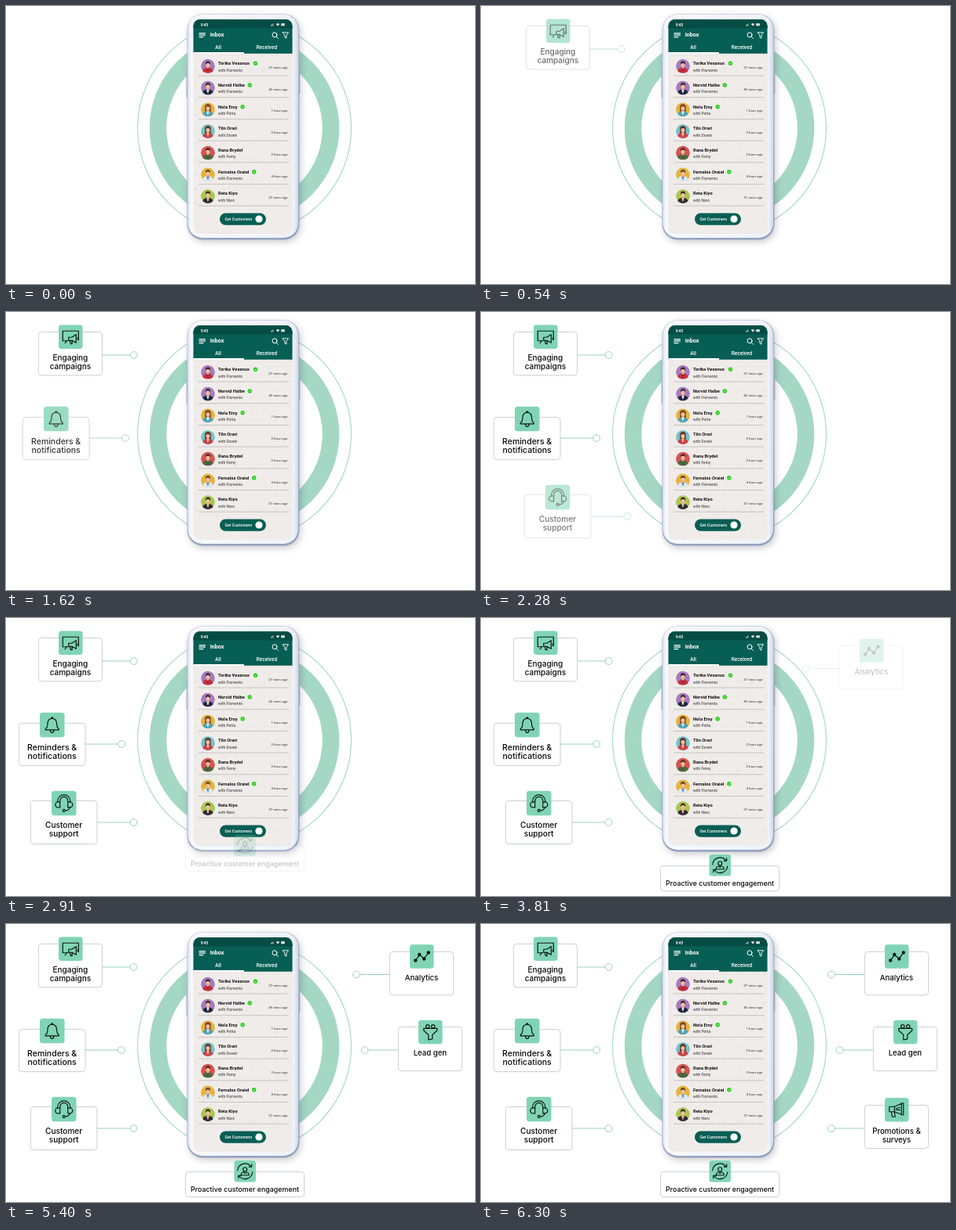
Animation, 597 px wide and 355 px high, one loop 8.3 s. Source, as an HTML page:

```html
<!DOCTYPE html>
<html lang="en">
<head>
<meta charset="utf-8">
<title>Inbox features</title>
<style>
  html, body { margin: 0; width: 100%; height: 100%; overflow: hidden; background: #fff; }
  svg { display: block; }
  text { font-family: Roboto, sans-serif; }
  .card text { font-family: Inter, sans-serif; font-weight: 500; fill: #080808; text-anchor: middle; }
  .box { fill: #fff; stroke: #bcc0c3; stroke-width: .7; filter: drop-shadow(.3px .5px .8px #0001); }
  .link { fill: #fff; stroke: #9bd2bc; }
  .icon { fill: none; stroke: #0c1a14; stroke-width: 1.2; stroke-linecap: round; stroke-linejoin: round; }
  .icon .solid { fill: #0c1a14; stroke: none; }
  .icon .tile { fill: #80d4b5; }
  .name { font-size: 5.8px; font-weight: 700; fill: #111; }
  .sub { font-size: 4.9px; font-weight: 500; fill: #555; }
  .ago { font-size: 4.4px; font-weight: 500; fill: #555; text-anchor: end; }
  .head { fill: #fff; font-weight: 500; }
  .white { fill: none; stroke: #fff; stroke-linecap: round; stroke-linejoin: round; }
</style>
</head>
<body>
<svg width="597" height="355" viewBox="0 0 597 355">
  <defs>
    <clipPath id="screen"><rect x="238.5" y="17.3" width="126" height="273.2" rx="8"/></clipPath>
    <clipPath id="disc"><circle r="9"/></clipPath>
    <linearGradient id="edge" x2=".3" y2="1">
      <stop offset="0" stop-color="#b9c2d2"/><stop offset="1" stop-color="#93a2c0"/>
    </linearGradient>
    <linearGradient id="frame">
      <stop offset="0" stop-color="#dde4ef"/><stop offset=".03" stop-color="#f6f8fc"/>
      <stop offset=".96" stop-color="#eef2f8"/><stop offset="1" stop-color="#cfd8e7"/>
    </linearGradient>
    <pattern id="doodle" width="17" height="19" patternUnits="userSpaceOnUse">
      <path d="M2 4h4v3h-4zM10 3l3 3M4 14q3-4 5 0M13 12v4" fill="none" stroke="#e8e3de" stroke-width=".7"/>
    </pattern>
  </defs>

  <g fill="none" stroke="#a4d8c4">
    <circle cx="303.5" cy="156" r="136" stroke-width="1.1"/>
    <circle cx="303.5" cy="156" r="110" stroke-width="21.5"/>
  </g>

  <g id="phone">
    <path d="M230.3 80v37M373.6 75v37" stroke="#b3bed2" stroke-width="1.4"/>
    <rect x="230.6" y="10.2" width="142.8" height="288.4" rx="20" fill="url(#edge)"
      style="filter:drop-shadow(2px 3px 4px #0003)"/>
    <rect x="231.4" y="10.8" width="140.6" height="285.2" rx="19" fill="url(#frame)"/>
    <g clip-path="url(#screen)">
      <path d="M238 17h127v274h-127z" fill="#f0ece9"/>
      <path d="M238 61h127v230h-127z" fill="url(#doodle)"/>
      <path d="M238 17h127v43.7h-127z" fill="#075e54"/>
      <path d="M238 17h127v11.5h-127z" fill="#054d44"/>
      <path d="M238 59h65v2h-65z" fill="#fff"/>
    </g>
    <g class="head">
      <text x="248" y="25.5" font-size="4.5" font-weight="700">9:45</text>
      <text x="259.7" y="39.4" font-size="7.2" font-weight="700">Inbox</text>
      <text x="270" y="54.5" font-size="6.5" text-anchor="middle">All</text>
      <text x="332" y="54.5" font-size="6.5" text-anchor="middle">Received</text>
      <path d="M337 25.4v-1h.7v1zM338.3 25.4v-2h.7v2zM339.6 25.4v-3h.7v3zM343.8 23q2.2-1.6 4.4 0l-2.2 2.5zM350.3 22.2h4.4v3h-4.4z"/>
    </g>
    <path class="white" d="M246 34.8h7.5M246 37.2h7.5M246 39.6h5" stroke-width="1.2"/>
    <path class="white" d="M344.3 39.3l2.2 2.2M352.3 33.8h7.2l-2.6 3.6v3.8l-2-1.2v-2.6z" stroke-width=".9"/>
    <circle class="white" cx="342" cy="36.8" r="3"/>
    <g id="rows"></g>
    <rect x="272" y="264.5" width="59" height="15.2" rx="7.6" fill="#075e54"/>
    <text class="head" x="278.5" y="273.9" font-size="5.2" font-weight="700">Get Customers</text>
    <circle cx="322" cy="272" r="4.6" fill="#fff"/>
  </g>
  <g id="cards"></g>
</svg>
<script>
const STEP = 900, LOOP = 8300, END = 6300, TICK = 30;

// name, contact, time, badge x, backdrop, clothes, shirt, hair, long hair
const rows = [
  ['Torika Vexanus', 'Fiorvento', '37 mins', 317.5, '#a67bbf', '#c5303c', '#8f1f2c', '#33222d', 0],
  ['Norvid Halbe', 'Fiorvento', '45 mins', 310.3, '#a67bbf', '#20283f', '#f2f2f2', '#3a2727', 0],
  ['Nola Ersy', 'Potta', '1 hour', 301.2, '#e5b43b', '#4fa3b5', '#f4f4f4', '#7a4524', 1],
  ['Tiln Orari', 'Dovek', '2 hour', 0, '#70c5c9', '#c94149', '#f0bd9b', '#6b3129', 1],
  ['Rana Brydel', 'Femy', '2 hour', 0, '#d75350', '#4c6940', '#3c5533', '#4a2b22', 0],
  ['Fernalos Oraiel', 'Fiorvento', '4 hour', 315.8, '#e5b43b', '#dce7ef', '#4b7fb0', '#60402b', 0],
  ['Reta Kiyo', 'Naro', '37 mins', 0, '#a9c64f', '#2d2b35', '#f0bd9b', '#3d2521', 0]
];

const avatar = (backdrop, clothes, shirt, hair, long) => `<g clip-path="url(#disc)">
  <circle r="9" fill="${backdrop}"/>
  ${long ? `<path d="M-3.8 3.5V-3a3.8 4 0 0 1 7.6 0V3.5z" fill="${hair}"/>` : ''}
  <path d="M-7 9Q-7 2.6-2 2H2Q7 2.6 7 9z" fill="${clothes}"/>
  <path d="M-1.9 2H1.9L0 7.5z" fill="${shirt}"/>
  <path d="M-1.3 0h2.6v2.2l-1.3 1.4-1.3-1.4z" fill="#e5ab88"/>
  <ellipse cy="-2" rx="2.6" ry="3.2" fill="#f0bd9b"/>
  <path d="M-3-1.8Q-3.6-6.4 0-6.4T3-1.8Q2.3-3.8 0-3.9T-3-1.8z" fill="${hair}"/></g>`;

document.getElementById('rows').innerHTML = rows.map(([name, contact, time, badge, ...look], i) => `
  <g transform="translate(0 ${76.8 + i * 27.7})">
    <g transform="translate(257)">${avatar(...look)}</g>
    <text class="name" x="270" y="-1.6">${name}</text>
    <text class="sub" x="270" y="6.8">with ${contact}</text>
    <text class="ago" x="358.5" y="3.2">${time} ago</text>
    ${badge ? `<circle cx="${badge}" cy="-3.5" r="2.7" fill="#27cf1b"/>
    <path class="white" d="M${badge - 1.1}-3.5l.8.9 1.5-1.7" stroke-width=".6"/>` : ''}
    <path d="M245 12.2H360" stroke="#bcb8b5" stroke-width=".8"/>
  </g>`).join('');

// Icons are drawn around their own centre.
const icons = {
  campaign: `<path d="M-3 5H-10V-7.5H10V4M-7 8l2-3"/>
    <path class="tile" d="M-2.5 0.5H1.5L7-3V7.5L1.5 4.5H-2.5zM-1 4.8l1 4H2L1.5 4.6M9 1v2.4"/>`,
  bell: `<path d="M-8.5 6.5H8.5V5Q5.8 3.5 5.8-1.5Q5.5-8 0-8T-5.8-1.5Q-5.8 3.5-8.5 5zM-2.3 7Q-2 10 0 10T2.3 7M-1.2-8.2a1.2 1.4 0 1 1 2.4 0"/>`,
  headset: `<path d="M-8-1.5V-3a8 7.5 0 0 1 16 0V-1.5M-5-2V-3a5 5 0 0 1 10 0V-2M7.5 5Q7 9 2 9.5"/>
    <path d="M-8-1.5h3v7h-2a3 3 0 0 1-1-7zM8-1.5H5v7h2a3 3 0 0 0 1-7z"/><circle cx="0" cy="9.5" r="1.5"/>`,
  person: `<path d="M-9.5-1a9.5 9.5 0 0 1 17-5M9.5 1a9.5 9.5 0 0 1-17 5M8.4-9v3.4H5M-8.4 9V5.6H-5"/>
    <circle cy="-2.5" r="2.5"/><path d="M-5 5Q-5 1.5-1.5 1L0 2.6 1.5 1Q5 1.5 5 5z"/>`,
  chart: `<path d="M-8 5L-3-2 3 2.5 8.5-5"/><g class="solid"><circle cx="-8" cy="5" r="2.2"/>
    <circle cx="-3" cy="-2.5" r="2.2"/><circle cx="3" cy="3" r="2.2"/><circle cx="8.5" cy="-5" r="2.2"/></g>`,
  funnel: `<path d="M-8.5-4.5H8.5V-2L2.5 3.5V9L-2.5 10V3.5L-8.5-2z"/>
    <circle cx="-3.5" cy="-7.2" r="2.2"/><circle cx="3.5" cy="-7.2" r="2.2"/>`,
  megaphone: `<path d="M-9.5-4H-3L6-8V6L-3 2.5H-9.5zM-3-4V2.5M-7 2.8L-5.5 9H-2L-3 3M6-8.5H8.5V6.5H6z"/>
    <path d="M-1-1.5L4-3M-1 .2H4"/>`
};

// box: x, y, w, h; tile: x, y, size; dx/dy: offset at the start of the slide
const cards = [
  { box: [41.4, 25.5, 81, 55.3], tile: [67, 16.5, 30.5], dot: [162.5, 55], dx: 40, size: 10, base: 61.8, icon: 'campaign', lines: ['Engaging', 'campaigns'] },
  { box: [16.4, 134.5, 84.5, 54], tile: [43, 120.7, 31.5], dot: [147, 161], dx: 25, size: 10.5, base: 168.5, icon: 'bell', lines: ['Reminders &amp;', 'notifications'] },
  { box: [31.4, 233.5, 84.5, 55], tile: [58, 220.7, 31.5], dot: [162.5, 261], dx: 51, size: 10.1, base: 268.3, icon: 'headset', lines: ['Customer', 'support'] },
  { box: [228.5, 316.5, 151, 32], tile: [290.5, 302, 27.5], dy: -33, size: 8.9, base: 342, icon: 'person', lines: ['Proactive customer engagement'] },
  { box: [488.4, 35.5, 81.2, 55.3], tile: [514, 26.3, 30.5], dot: [446, 64.5], dx: -42, size: 9.6, base: 71.5, icon: 'chart', lines: ['Analytics'] },
  { box: [499.4, 131.5, 81, 56], tile: [525, 122.7, 30.5], dot: [456.5, 161], dx: -28, size: 9.6, base: 168, icon: 'funnel', lines: ['Lead gen'] },
  { box: [488.4, 231.5, 81.2, 55], tile: [514, 222, 30.5], dot: [446, 261], dx: -55, size: 9.7, base: 268, icon: 'megaphone', lines: ['Promotions &amp;', 'surveys'] }
];

function drawCard({ box: [x, y, w, h], tile: [tx, ty, side], dot, size, base, icon, lines }) {
  const mid = x + w / 2;
  const link = dot ? `<path class="link" d="M${mid} ${dot[1]}H${dot[0]}"/>
    <circle class="link" cx="${dot[0]}" cy="${dot[1]}" r="4.4"/>` : '';
  return `<g class="card" opacity="0">${link}
    <rect class="box" x="${x}" y="${y}" width="${w}" height="${h}" rx="4"/>
    <rect x="${tx}" y="${ty}" width="${side}" height="${side}" rx="3.5" fill="#80d4b5"/>
    <g class="icon" transform="translate(${tx + side / 2} ${ty + side / 2})">${icons[icon]}</g>
    ${lines.map((line, i) => `<text x="${mid}" y="${base + i * 11}" font-size="${size}">${line}</text>`).join('')}</g>`;
}

const layer = document.getElementById('cards');
layer.innerHTML = cards.map(drawCard).join('');

function render(now) {
  const time = Math.min(END, Math.floor(now % LOOP / TICK) * TICK);
  cards.forEach(({ dx = 0, dy = 0 }, i) => {
    const progress = Math.max(0, Math.min(1, time / STEP - i));
    const rest = 1 - progress;
    layer.children[i].setAttribute('opacity', progress);
    layer.children[i].setAttribute('transform', `translate(${dx * rest} ${dy * rest})`);
  });
}

const start = performance.now();
function tick() {
  render(performance.now() - start);
  requestAnimationFrame(tick);
}
tick();
</script>
</body>
</html>
```
